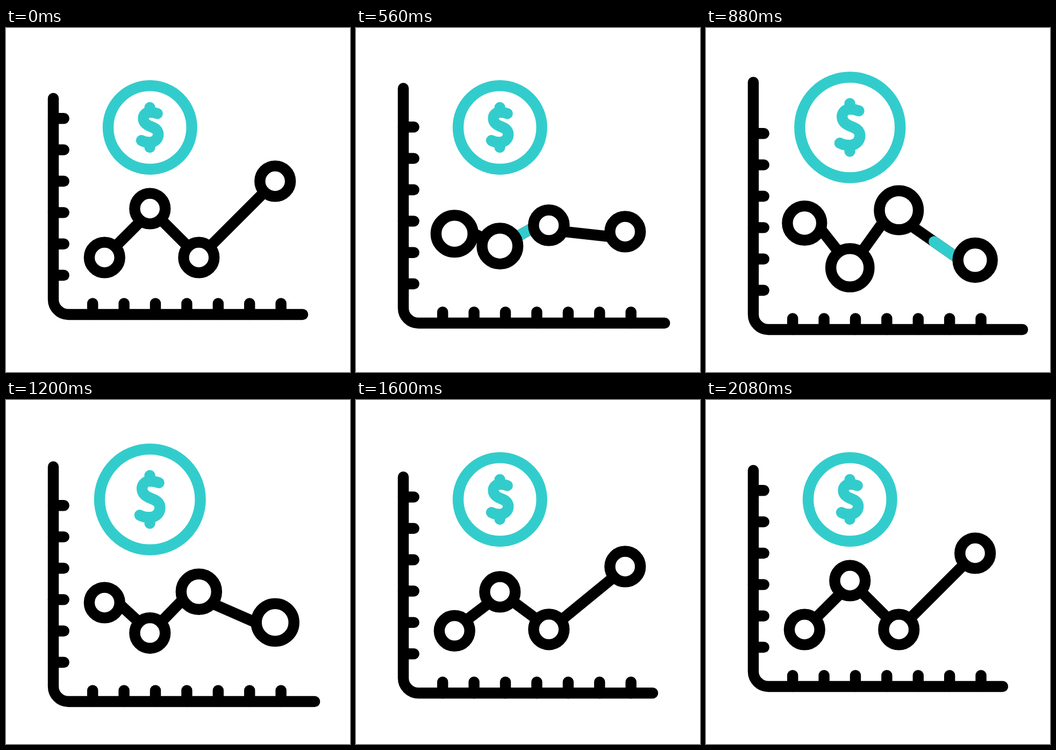
An HTML page with a canvas for the animation above (2240 ms loop, 640x640 px).

```html
<!DOCTYPE html>
<html lang="en">
<head>
<meta charset="utf-8">
<title>Chart with coin</title>
<style>
  html, body { margin: 0; width: 100%; height: 100%; overflow: hidden; background: #fff; }
  canvas { display: block; width: 640px; height: 640px; }
</style>
</head>
<body>
<canvas id="stage" width="640" height="640"></canvas>
<script>
const ctx = document.getElementById('stage').getContext('2d');
const LOOP = 2240, STEP = 40;
const INK = '#000', TEAL = '#33cccc', WIDTH = 20.4;

const clamp = v => Math.max(0, Math.min(1, v));
const smooth = v => { v = clamp(v); return v * v * (3 - 2 * v); };
const mix = (a, b, k) => a + (b - a) * k;

// Smooth curve through [time, value] keys, without overshoot.
function track(keys) {
  const slope = i => (keys[i + 1][1] - keys[i][1]) / (keys[i + 1][0] - keys[i][0]);
  const tangent = keys.map((_, i) => {
    if (i === 0 || i === keys.length - 1) return 0;
    const a = slope(i - 1), b = slope(i);
    return a * b <= 0 ? 0 : 2 * a * b / (a + b);
  });
  return t => {
    if (t <= keys[0][0]) return keys[0][1];
    for (let i = 0; i < keys.length - 1; i++) {
      const [t0, v0] = keys[i], [t1, v1] = keys[i + 1];
      if (t > t1) continue;
      const d = t1 - t0, u = (t - t0) / d, w = 1 - u;
      return v0 * w * w * (1 + 2 * u) + v1 * u * u * (3 - 2 * u)
        + d * u * w * (tangent[i] * w - tangent[i + 1] * u);
    }
    return keys[keys.length - 1][1];
  };
}

// Rise to the peak, then fall back.
const pulse = (t, start, peak, end) =>
  t < peak ? smooth((t - start) / (peak - start)) : smooth((end - t) / (end - peak));

const drop = track([[0, 0], [320, 3.9], [560, 16], [880, 28], [1040, 29.6],
  [1200, 28], [1600, 12.2], [1760, 4.2], [2080, 0]]);
const swing = track([[80, 0], [320, .131], [560, .655], [880, 1], [960, 1.015],
  [1200, .848], [1600, .107], [1840, 0]]);
const grow = track([[160, 0], [320, .085], [560, .6], [880, 1],
  [1200, .6], [1440, .085], [1600, 0]]);

const nodes = [
  { x: 183.3, y: 427, move: -92, size: 7.5, beat: [208, 702, 1043] },
  { x: 267.8, y: 336, move: 82, size: 9, beat: [330, 760, 1180] },
  { x: 358.8, y: 427, move: -116, size: 9, beat: [525, 980, 1430] },
  { x: 500.7, y: 285, move: 119, size: 8, beat: [693, 1093, 1495] }
];

// from / to: x, y, vertical travel. The spark's head and tail run along each link.
const links = [
  { from: [203, 407, -74], to: [248, 362, 28], head: 258, tail: 380, time: 110 },
  { from: [288, 356, 35], to: [339, 407, -87], head: 450, tail: 580, time: 120 },
  { from: [379, 407, -69], to: [481, 305, 104], head: 680, tail: 800, time: 180 }
];

const dollar = new Path2D(
  'M14 -25.7C9 -27.6 5 -28.4 0 -28.4C-7 -28.4 -12 -23 -12 -17' +
  'C-12 -8 -5 -4.5 1 -2C8 .8 15.6 3.5 15.6 13C15.6 21 9 27.6 0 27.6' +
  'C-6 27.6 -11 27 -15.6 24.2M0 -37V-28M0 28V37');

function stroke(color, x0, y0, x1, y1) {
  ctx.strokeStyle = color;
  ctx.beginPath();
  ctx.moveTo(x0, y0);
  ctx.lineTo(x1, y1);
  ctx.stroke();
}

function ring(color, x, y, r) {
  ctx.strokeStyle = color;
  ctx.fillStyle = '#fff';
  ctx.beginPath();
  ctx.arc(x, y, r, 0, Math.PI * 2);
  ctx.fill();
  ctx.stroke();
}

function drawAxes(t, dy) {
  const g = grow(t), base = 533 + dy;
  ctx.strokeStyle = INK;
  ctx.beginPath();
  ctx.moveTo(88, 131 + dy - 58 * g);
  ctx.lineTo(88, base - 28);
  ctx.arcTo(88, base, 116, base, 28);
  ctx.lineTo(552 + 37 * g, base);
  ctx.stroke();
  for (let i = 0; i < 6; i++) {
    const y = 168.3 + 58.35 * i + dy;
    stroke(INK, 88, y, 107.7, y);
  }
  for (let i = 0; i < 7; i++) {
    const x = 161.2 + 58.4 * i;
    stroke(INK, x, base - 20.6, x, base);
  }
}

function drawLinks(t, dy, p) {
  for (const { from, to, head, tail, time } of links) {
    const x0 = from[0], y0 = from[1] + from[2] * p + dy;
    const x1 = to[0], y1 = to[1] + to[2] * p + dy;
    stroke(INK, x0, y0, x1, y1);
    const a = clamp((t - tail) / time), b = clamp((t - head) / time);
    if (b > a) {
      stroke(TEAL, mix(x0, x1, a), mix(y0, y1, a), mix(x0, x1, b), mix(y0, y1, b));
    }
  }
}

function drawCoin(t) {
  const up = t < 1040 ? smooth((t - 600) / 400) : smooth((1485 - t) / 400);
  const r = 77.8 + 20 * up, k = r / 77.8;
  ring(TEAL, 267.8, 185, r);
  // Scale the sign but keep its line weight.
  ctx.save();
  ctx.translate(267.6, 185);
  ctx.scale(k, k);
  ctx.lineWidth = WIDTH / k;
  ctx.stroke(dollar);
  ctx.restore();
}

function draw(t) {
  const dy = drop(t), p = swing(t);
  ctx.fillStyle = '#fff';
  ctx.fillRect(0, 0, 640, 640);
  ctx.lineWidth = WIDTH;
  ctx.lineCap = ctx.lineJoin = 'round';
  drawAxes(t, dy);
  drawLinks(t, dy, p);
  for (const n of nodes) {
    ring(INK, n.x, n.y + n.move * p + dy, 28.4 + n.size * pulse(t, ...n.beat));
  }
  drawCoin(t);
}

const begin = performance.now();
function tick(now) {
  const t = Math.max(0, now - begin) % LOOP;
  draw(Math.min(2080, Math.floor(t / STEP) * STEP));
  requestAnimationFrame(tick);
}
draw(0);
requestAnimationFrame(tick);
</script>
</body>
</html>
```
